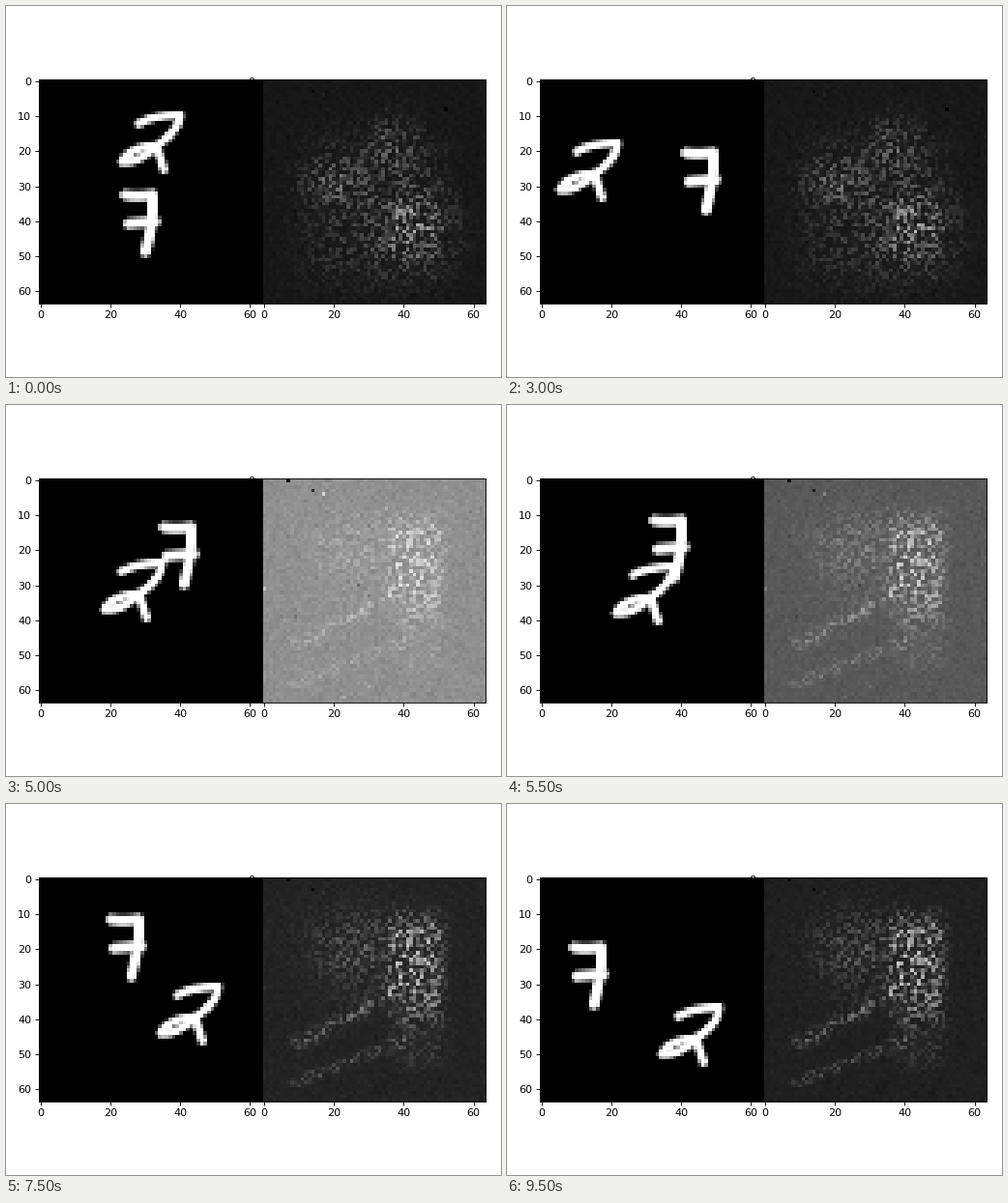
Write a matplotlib script that moves like this. It is 512x384 px and loops after 10000 ms.

```python
import numpy as np
import matplotlib.pyplot as plt
from matplotlib.animation import FuncAnimation

W, H, DPI = 512, 384, 80
N, FRAMES, INTERVAL = 64, 20, 500
SIDE = 231.2
LEFT, BOTTOM = 33.85, (H - SIDE) / 2

ROW, COL = np.mgrid[:N, :N].astype(float)


def distance(x, y, a, b):
    """Distance from every cell to the segment a-b."""
    d = np.subtract(b, a)
    t = np.clip(((x - a[0]) * d[0] + (y - a[1]) * d[1]) / (d @ d), 0, 1)
    return np.hypot(x - a[0] - t * d[0], y - a[1] - t * d[1])


def curve(start, control, end, steps=8):
    t = np.linspace(0, 1, steps)[:, None]
    start, control, end = map(np.array, (start, control, end))
    return (1 - t) ** 2 * start + 2 * t * (1 - t) * control + t ** 2 * end


def glyph(shape, strokes, radius):
    """Soft-edged curves on a small grid, sampled at the cell centres."""
    y, x = np.mgrid[:shape[0], :shape[1]] + 0.5
    dist = np.min([distance(x, y, a, b) for s in strokes
                   for a, b in zip(s, s[1:])], axis=0)
    return np.clip((radius + 0.45 - dist) / 0.9, 0, 1)


CORNER, KNOT, HEEL = (18.2, 2.2), (11.5, 11), (1.8, 15.5)
TWO = glyph((20, 20), [
    curve((6.6, 4.6), (11, 2.2), CORNER),
    curve(CORNER, (17.8, 7), KNOT),
    curve(KNOT, (6.5, 16), HEEL),
    curve(HEEL, (4, 11.2), KNOT),
    curve(KNOT, (12.3, 13), (13.7, 17.7)),
], 1.2)
SEVEN = glyph((20, 12), [
    curve((1.7, 2), (5, 2.6), (9.4, 1.9)),
    curve((9.4, 1.9), (10.1, 8), (7.4, 18.2)),
    curve((2.6, 10.2), (6, 9.9), (10.2, 9.6)),
], 1.5)


def bounce(start, speed, low, high):
    """Whole-cell positions; the path is clamped and reversed at the walls."""
    pos, path = start, []
    for _ in range(FRAMES):
        path.append(int(pos))
        pos += speed
        if not low <= pos <= high:
            pos, speed = min(max(pos, low), high), -speed
    return path


ACTORS = [
    (TWO, bounce(22.05, -3.3, 4, 40), bounce(8.45, 1.4, 4, 40)),
    (SEVEN, bounce(23.4, 2.912, 7, 43), bounce(31.7, -1.96, 7, 43)),
]


def digits(i):
    img = np.zeros((N, N))
    for shape, xs, ys in ACTORS:
        h, w = shape.shape
        img[ys[i]:ys[i] + h, xs[i]:xs[i] + w] += shape
    return np.clip(img, 0, 1)


def blob(x, y, rx, ry, power=2):
    return np.exp(-np.abs((COL - x) / rx) ** power - np.abs((ROW - y) / ry) ** power)


def ridge(a, b, width):
    return np.exp(-(distance(COL, ROW, a, b) / width) ** 2)


rng = np.random.default_rng(4)


def speckle(envelope):
    return np.clip(envelope * rng.random((N, N)) ** 2.2, 0, 1)


FIRST = speckle(0.55 * blob(43, 42, 10, 10) + 0.32 * blob(20, 29, 8, 6)
                + 0.32 * blob(37, 18, 7, 8) + 0.20 * blob(31, 37, 21, 22, 4))
SECOND = speckle(0.70 * blob(43.5, 25, 8, 15, 6) + 0.35 * blob(27, 20, 13, 11)
                 + 0.40 * ridge((10, 47), (35, 33), 2)
                 + 0.30 * ridge((9, 58), (40, 46), 1.4)
                 + 0.15 * blob(44, 46, 8, 8, 4))
GRAIN = rng.normal(0, 1, (N, N))
SPECKS = (rng.random((N, N)) < 0.006) * GRAIN


def background(i):
    """Grey level: swells up to the switch of maps, then decays."""
    if i <= 10:
        return 23 + 120 * np.exp(-((10 - i) / 1.84) ** 2)
    return 31 + 112 * np.exp(-(i - 10) / 1.5)


def noise_map(i):
    base, mix = background(i), np.clip((i - 8) / 2, 0, 1)
    signal = (1 - mix) * FIRST + mix * SECOND
    img = base + (255 - base) * signal
    img += GRAIN * (1.5 + base * 0.025) + SPECKS * base * 0.25
    darkest = (8, 52) if mix < 0.5 else (0, 7)
    img[darkest] = 0
    return np.clip(img, 0, 255)


fig = plt.figure(figsize=(W / DPI, H / DPI), dpi=DPI, facecolor="white")


def panel(x, vmax):
    ax = fig.add_axes([x / W, BOTTOM / H, SIDE / W, SIDE / H])
    image = ax.imshow(np.zeros((N, N)), cmap="gray", vmin=0, vmax=vmax,
                      interpolation="nearest", aspect="auto")
    ax.set_xticks(range(0, N, 20))
    ax.set_yticks(range(0, N, 10))
    return image


left_image = panel(LEFT, 1)
right_image = panel(LEFT + SIDE, 255)


def update(i):
    left_image.set_data(digits(i))
    right_image.set_data(noise_map(i))
    return left_image, right_image


anim = FuncAnimation(fig, update, frames=FRAMES, interval=INTERVAL,
                     repeat=True, repeat_delay=0, blit=False)
plt.show()
```
